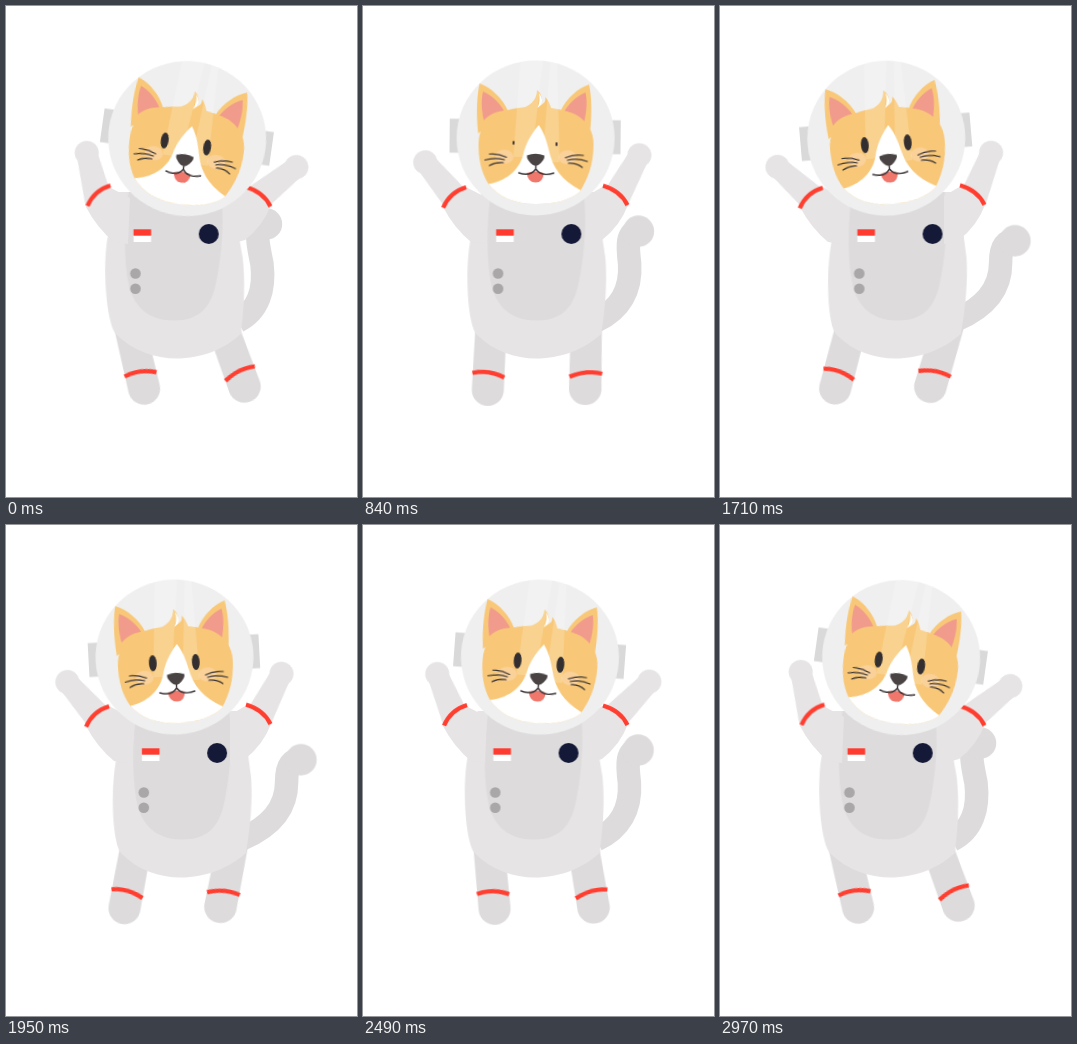
Write an HTML page that moves like this. It is 351 px wide and 491 px high and loops after 3000 ms.

```html
<!DOCTYPE html>
<html lang="en">
<head>
<meta charset="utf-8">
<title>Waving astronaut cat</title>
<style>
  html, body { margin: 0; width: 100%; height: 100%; overflow: hidden; background: #fff; }
  svg { display: block; width: 351px; height: 491px; }

  .suit { fill: #e6e4e5; }
  .shade { fill: #dddbdc; }
  .fur { fill: #f8c878; }
  .pink { fill: #f19b8c; }
  .ink { fill: #332e2f; }
  .band { fill: none; stroke: #ff3e30; stroke-width: 4.3; }
  .line { fill: none; stroke: #3a3435; stroke-width: 1.4; stroke-linecap: round; }

  /* Each part swings from --a to --b and back; only the turning point differs. */
  .sway, .wave, .tail, .tip, .eye {
    animation: sway 3s cubic-bezier(.364, 0, .636, 1) infinite;
  }
  .wave { animation-name: wave; }
  .tail { animation-name: curl; fill: none; stroke: #dddbdc; stroke-width: 23.5; }
  .tip { animation-name: tip; }
  .eye { animation-name: blink; transform-box: fill-box; transform-origin: center; }

  @keyframes sway { 0%, 100% { transform: var(--a); } 52% { transform: var(--b); } }
  @keyframes wave { 0%, 100% { transform: var(--a); } 45.5% { transform: var(--b); } }
  @keyframes tip { 0%, 100% { transform: translate(0, 0); } 62% { transform: translate(35px, 17px); } }
  @keyframes curl {
    0%, 100% { d: path("M232 315 C252 305 259 284 256 258 C252 238 247 221 261 217"); }
    62% { d: path("M236 314 C264 302 281 284 281 257 C281 240 286 235 296 234"); }
  }
  @keyframes blink { 0%, 24%, 32%, 100% { transform: scale(1); } 28% { transform: scale(.26); } }

  .leg-l { --a: rotate(-14deg); --b: rotate(14.5deg); transform-origin: 127px 336px; }
  .leg-r { --a: rotate(-18.5deg); --b: rotate(19deg); transform-origin: 224px 338px; }
  .torso { --a: skewX(1.55deg); --b: skewX(-1.4deg); transform-origin: 172px 448px; }
  .front { --a: translate(-5.3px, 0); --b: translate(4.8px, 0); }
  .arm-l { --a: rotate(-14deg); --b: rotate(-52deg); }
  .arm-r { --a: rotate(51.5deg); --b: rotate(18deg); }
  .cuff-l { --a: translate(1.5px, -1.5px); --b: translate(-.5px, 1px); }
  .cuff-r { --a: translate(0, 1.5px); --b: translate(0, -.5px); }
  .head { --a: rotate(8deg); --b: rotate(-5.3deg); transform-origin: 172px 198px; }
</style>
</head>
<body>
<svg viewBox="0 0 351 491" aria-label="Cat in a space suit waving">
  <defs>
    <clipPath id="face">
      <path d="M114 138 C114 113 136 101 170 101 C206 101 229 113 229 138 C229 158 224 171 216 185 C206 194 190 198 172 198 C150 198 134 191 124 178 C117 167 114 154 114 138 Z"/>
    </clipPath>
    <clipPath id="glass"><ellipse cx="172" cy="132" rx="79" ry="77.5"/></clipPath>
    <g id="forearm" class="suit">
      <path d="M-14 4 L-10.5 -44 H10.5 L14 4 Z"/>
      <circle cy="-46.5" r="12"/>
    </g>
    <g id="ear">
      <path class="fur" d="M113.500 128 C111 108 112 89 114.500 78 C126 82 137 92 143 105 Z"/>
      <path class="pink" d="M119 115 C116 102 116.500 92 118 86 C128 90 135 98 139 105 C130 106 123 110 119 115 Z"/>
    </g>
  </defs>

  <path class="tail" d="M232 315 C252 305 259 284 256 258 C252 238 247 221 261 217"/>
  <circle class="tip shade" cx="260.500" cy="218" r="15.700"/>

  <g class="sway leg-l">
    <path class="shade" d="M112 318 H143 L142.500 384 A16 16 0 0 1 110.500 384 Z"/>
    <path class="band" d="M110.500 367.500 Q127 363.500 142.500 371"/>
  </g>
  <g class="sway leg-r">
    <path class="shade" d="M207 318 H238 L240.500 384 A16.300 16.300 0 0 1 208 384 Z"/>
    <path class="band" d="M208 371.500 Q223 364 240.500 367"/>
  </g>

  <path class="sway torso suit" d="M118 186 L107 234 C103 256 103 292 108 315 Q110 325 114 329 C130 345 152 352.500 173 352.500 C198 352.500 222 343 238 328 C242 305 244 275 242 252 L232 186 Z"/>

  <g class="sway front">
    <path class="shade" d="M128 186 C123 212 123 256 128 278 C133 302 149 314.500 173 314.500 C198 314.500 210 302 215 278 C221 250 224 215 220 186 Z"/>
    <path fill="#fff" d="M132.800 229 h17.600 v7 h-17.600 Z"/>
    <path fill="#ff3b30" d="M132.800 223.300 h17.600 v6.400 h-17.600 Z"/>
    <circle cx="208" cy="228" r="10" fill="#141937"/>
    <g fill="#a9a7a8">
      <circle cx="134.700" cy="267.500" r="5.300"/>
      <circle cx="134.700" cy="282.700" r="5.300"/>
    </g>
  </g>

  <g transform="translate(92 192)"><use href="#forearm" class="wave arm-l"/></g>
  <g transform="translate(254 190)"><use href="#forearm" class="wave arm-r"/></g>
  <path class="suit" d="M80 201 Q87 186 103 181 L124 192 L122 238 L108 236 Q91 222 80 201 Z"/>
  <path class="suit" d="M241 180 Q258 184 265 199 Q257 220 239 234 L224 238 V190 Z"/>
  <path class="wave cuff-l band" d="M80 201.500 Q86.500 186 103 181"/>
  <path class="wave cuff-r band" d="M240 179.500 Q257.500 184.500 264.500 199"/>

  <g class="sway head">
    <path fill="#d9d9da" d="M86 113.500 h10 v34 h-10 Z M247 113.500 h10 v34 h-10 Z"/>
    <ellipse cx="172" cy="132" rx="79" ry="77.500" fill="#efefef"/>

    <g transform="translate(1 0)">
      <use href="#ear"/>
      <use href="#ear" transform="translate(338.500 0) scale(-1 1)"/>
      <g clip-path="url(#face)">
        <path class="fur" d="M105 90 H235 V205 H105 Z"/>
        <path fill="#fff" d="M174 119 C165 130 161 139 159 148 C155 165 141 176 122 179 V205 H222 V186 C204 179 191 167 186 150 C183 139 181 129 174 119 Z"/>
        <ellipse cx="140" cy="151" rx="9" ry="7" fill="#fad199"/>
        <ellipse cx="203" cy="151" rx="9" ry="7" fill="#fad199"/>
      </g>
      <path class="fur" d="M152 104 C165 101 172 94 172 84 C177 88 178 94 176 99 C180 97 181 94 180 91 C185 95 185 101 188 105 L176 112 L172 103 L168 112 Z"/>
      <path fill="#fff" d="M172.500 102 C175 97 175 92 174 87 C177 91 178 95 176 99 Z"/>
    </g>

    <g clip-path="url(#glass)" fill="#fff" fill-opacity=".18">
      <path d="M156 54 H179 L168 151 H150 Z"/>
      <path d="M186 54 H193 L196 156 H179 Z"/>
    </g>

    <ellipse class="eye ink" cx="150" cy="137" rx="3.900" ry="8"/>
    <ellipse class="eye ink" cx="193" cy="138" rx="3.900" ry="8"/>
    <path fill="#f0776c" d="M163.500 167 Q172 164 180.500 167 Q180 176.500 172.500 176.500 Q164.500 176.500 163.500 167 Z"/>
    <path class="line" d="M172.500 157 V163 M155.500 167 Q167 171 172.500 163 Q178 171 190.500 167"/>
    <path fill="#494344" d="M163.500 149.500 Q172 146 181 149.500 Q181.500 154 175 159 Q172.500 160.500 169.500 159 Q163 154 163.500 149.500 Z"/>
    <g class="line" style="stroke-width:1.200">
      <path d="M143 151.500 Q134 147.500 126 148.500 M141 154 Q131 151.500 121.500 154.500 M140 157 Q132 156.500 126 160"/>
      <path d="M202 151.500 Q211 147.500 220 149 M204 154 Q214 151.500 224 155 M205 157 Q213 156.500 219 161"/>
    </g>
  </g>
</svg>
</body>
</html>
```
